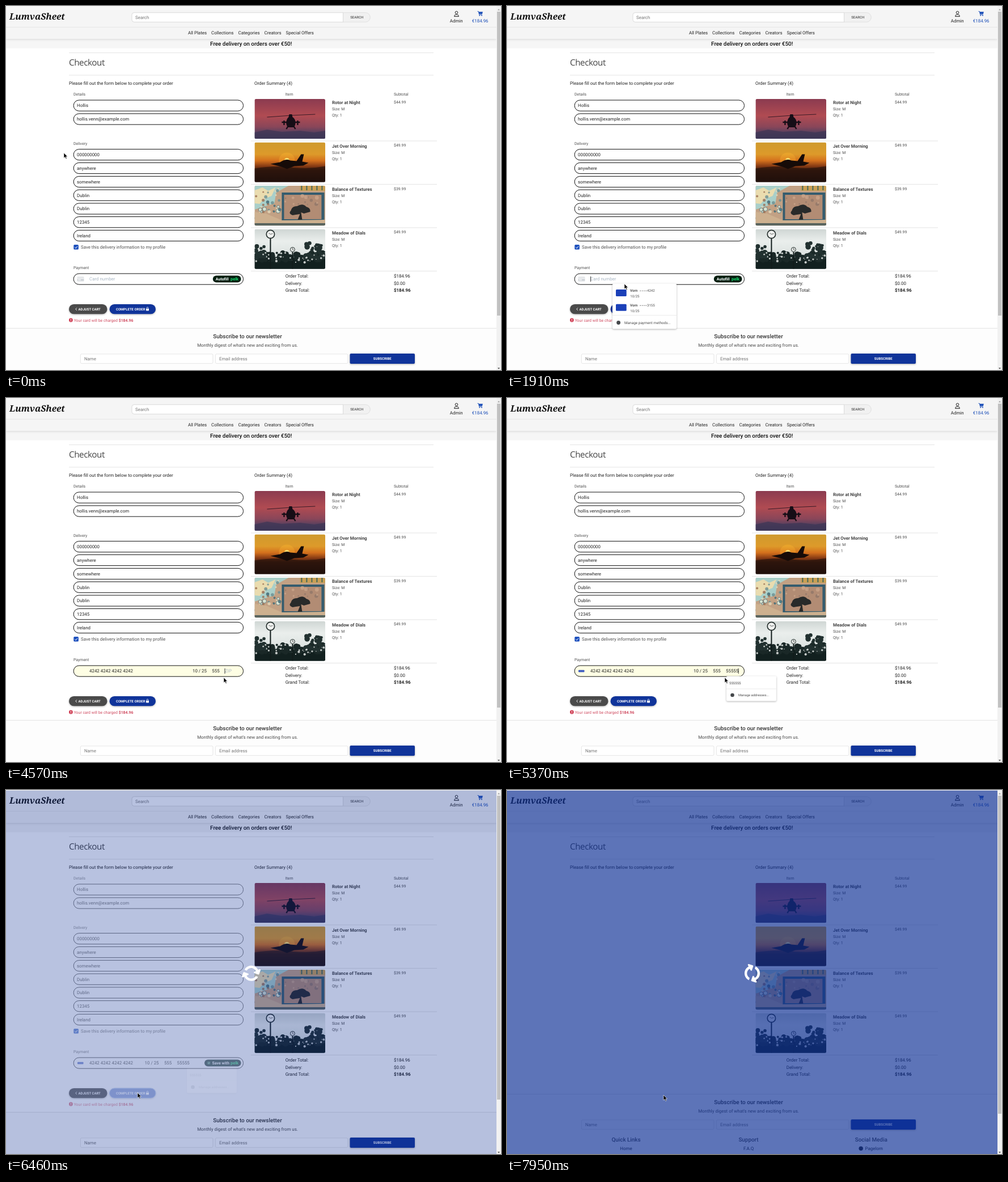
Animation, 873 px wide and 642 px high, one loop 8 s. Source, as an HTML page:

```html
<!DOCTYPE html>
<html lang="en">
<head>
<meta charset="utf-8">
<title>Checkout</title>
<style>
html, body { margin: 0; width: 100%; height: 100%; overflow: hidden; background: #fff; }
svg { display: block; width: 100%; height: 100%; font-family: Roboto, sans-serif; }
text { white-space: pre; text-rendering: geometricPrecision; }
.lift { filter: drop-shadow(0 1px 1.5px rgba(0, 0, 0, .3)); }
.bar { filter: drop-shadow(0 1px 2px rgba(0, 0, 0, .12)); }
</style>
</head>
<body>
<svg id="stage" viewBox="0 0 873 642" xmlns="http://www.w3.org/2000/svg"></svg>
<script>
const LOOP = 8000;
const BLUE = '#10349a', INK = '#212121', GREY = '#4f4f4f', PALE = '#aab7c4';
const MID = ' text-anchor="middle" ', BOLD = ' font-weight="700" ', SEMI = ' font-weight="500" ';

const text = (x, y, s, size = 7.92, fill = INK, more = '') =>
  `<text x="${x}" y="${y}" font-size="${size}" fill="${fill}" ${more}>${s}</text>`;
const rect = (x, y, w, h, fill, r = 0, more = '') =>
  `<rect x="${x}" y="${y}" width="${w}" height="${h}" rx="${r}" fill="${fill}" ${more}/>`;
const circle = (x, y, r, fill, more = '') => `<circle cx="${x}" cy="${y}" r="${r}" fill="${fill}" ${more}/>`;
const path = (d, fill = 'none', more = '') => `<path d="${d}" fill="${fill}" ${more}/>`;
const line = (d, color, width) => path(d, 'none', `stroke="${color}" stroke-width="${width}"`);
const rule = (x1, x2, y, c = '#d9d9d9') => line(`M${x1} ${y}H${x2}`, c, .7);
const group = (id, body) => `<g id="${id}">${body}</g>`;
const fade = (id, ...stops) => `<linearGradient id="${id}" x2="0" y2="1">` +
  stops.map(([o, c]) => `<stop offset="${o}" stop-color="${c}"/>`).join('') + '</linearGradient>';

let seed = 7;
const rnd = () => (seed = seed * 16807 % 2147483647) / 2147483647;
const many = (n, f) => Array.from({ length: n }, (_, i) => f(i)).join('');

function header() {
  return rect(0, 58, 865, 16.5, '#f6f6f6') + rect(0, 1, 865, 57, '#f5f5f5', 0, 'class="bar"') +
    rule(0, 865, 37.3, '#dedede') +
    `<text x="6" y="24" font-family="'Noto Serif', serif" font-style="italic" font-size="15.6" fill="#111"><tspan font-weight="800">Lumva</tspan><tspan font-weight="600">Sheet</tspan></text>` +
    path('M594.5 11.7H226q-4 0-4 4v8.6q0 4 4 4H594.5z', '#fff', 'stroke="#c6c6c6" stroke-width=".6"') +
    path('M594.5 11.7H634a8.3 8.3 0 0 1 0 16.6H594.5z', '#f1f1f1', 'stroke="#d2d2d2" stroke-width=".6"') +
    text(228, 22.8, 'Search', 7.92, '#757575') + text(618.7, 22.3, 'SEARCH', 6, GREY, MID + SEMI) +
    circle(794.5, 11.6, 2.3, 'none', 'stroke="#222"') +
    line('M790.6 18.5q0-3.2 2.6-3.2h2.6q2.6 0 2.6 3.2z', '#222', 1) +
    text(794.2, 29.4, 'Admin', 7.92, INK, MID) +
    line('M831.5 9.5h1.8l1.3 5.8h5', '#1c4fb8', .9) +
    path('M833.5 10.3h7.4l-1 4h-5.6z', '#1c4fb8') + circle(835.2, 16.7, .9, '#1c4fb8') + circle(839, 16.7, .9, '#1c4fb8') +
    text(836.2, 29.4, '€184.96', 7.92, '#1c4fb8', MID) +
    [[321, 'All Plates'], [362, 'Collections'], [409.5, 'Categories'], [455.5, 'Creators'], [493.5, 'Special Offers']]
      .map(([x, s]) => text(x, 50.2, s)).join('') +
    text(432.2, 69.5, 'Free delivery on orders over €50!', 9.9, '#111', MID + SEMI) +
    rule(111, 754, 82.5) + rule(111, 754, 122) +
    text(111, 105.3, 'Checkout', 15.2, '#444', `font-family="'Open Sans', sans-serif" letter-spacing="-.4"`) +
    text(111, 138.8, 'Please fill out the form below to complete your order') +
    text(438, 138.8, 'Order Summary (4)');
}

const photos = [
  () => rect(0, 0, 125, 70, 'url(#dusk)') +
    path('M0 59L22 54 48 58 80 56 105 59 125 56V71H0z', '#3c3655', 'opacity=".7"') +
    line('M22 32L64 29 107 27', '#2a1622', .9) +
    path('M61 27h5l1 5q4 2 5 8t-3 10h-10q-4-4-3-10t4-8z', '#160d16') +
    line('M48 41H80M52 38v8M76 38v8M59 48l-3 5M69 48l3 5', '#160d16', 2.4),
  () => rect(0, 0, 125, 70, 'url(#dawn)') + circle(57, 32, 14, '#ffb52e', 'opacity=".3"') + circle(57, 32, 4.5, '#ffdf70') +
    path('M0 46Q35 40 65 44T125 42V71H0z', '#22100b', 'opacity=".65"') +
    path('M28 38L45 35Q56 28 63 32L74 33 82 21 87 21 84 34 95 36 86 41 70 42 57 47 47 43z', '#160b08'),
  () => rect(0, 0, 125, 70, '#c2a184') + path('M0 0H60L38 12 35 31 0 42z', '#a9cfc9') +
    path('M0 8L14 3 24 9 37 3 30 18 17 23 9 32 0 31z', '#eadcaf') + path('M80 0H125V9H80z', '#c9a055') +
    line('M83 0V8M92 0V8M101 0V8M110 0V8M119 0V8', '#46685b', 2) +
    many(30, i => circle(rnd() * 46, 2 + rnd() * 60, .8 + rnd() * 2.2, ['#6b8f92', '#e6d9b8', '#9c6f52'][i % 3], 'opacity=".8"')) +
    rect(48, 12, 75, 50, '#355c6e') + rect(52, 16, 66, 43, '#b28c74') +
    many(14, i => circle(54 + rnd() * 62, 18 + rnd() * 16, 1 + rnd() * 2.5, i % 2 ? '#cfa98d' : '#8c7468', 'opacity=".7"')) +
    path('M0 46L20 49 48 61 125 60V71H0z', '#cdb08f') + rect(0, 66, 125, 5, '#59645e') +
    path('M76 60l4-10-13 2q-8-3-3-8 2-8 11-8 10-6 16 1 8 2 7 9l-11 3-5-2 2 13z', '#282a2a') +
    many(9, i => circle(8 + rnd() * 38, 23 + rnd() * 25, 1.5 + rnd() * 2.3, i % 2 ? '#527f89' : '#d6e1cf', 'stroke="#45616a" stroke-width=".7"')),
  () => rect(0, 0, 125, 70, 'url(#mist)') + rect(0, 50, 125, 21, '#12201f') +
    many(70, () => circle(rnd() * 125, 42 + rnd() * 13, 2 + rnd() * 4, '#1a2827')) +
    many(32, () => circle(90 + rnd() * 35, 24 + rnd() * 28, 2 + rnd() * 3, '#223130')) +
    many(16, () => circle(rnd() * 20, 30 + rnd() * 24, 2 + rnd() * 3.5, '#223130')) +
    many(32, () => circle(rnd() * 125, 41 + rnd() * 18, .6 + rnd() * 1.7, '#e4e8e6', 'opacity=".85"')) +
    line('M28 15V70M67 40V70', '#111c1b', 2) +
    circle(28, 9, 7.2, '#f0f2f0', 'stroke="#27312f" stroke-width="1.7"') + circle(67, 36, 4, '#e1e5e2', 'stroke="#27312f"') +
    line('M25 7l3 2 4-1M67 33v3l2 1', '#222', .7)
];

function summary() {
  const items = [['Rotor at Night', 44.99], ['Jet Over Morning', 49.99], ['Balance of Textures', 39.99], ['Meadow of Dials', 49.99]];
  const rows = items.map(([name, price], i) => {
    const y = 164 + i * 76.5;
    return `<g transform="translate(438.4 ${y})" clip-path="url(#thumb)">${photos[i]()}</g>` +
      text(575, y + 9, name, 7.92, '#444', BOLD) + text(575, y + 20.2, 'Size: M', 6.93, GREY) +
      text(575, y + 31, 'Qty: 1', 6.93, GREY) + text(684, y + 7.5, '$' + price, 6.93, GREY) + rule(432, 760, y + 74);
  }).join('');
  const totals = [['Order Total:', '$184.96', ''], ['Delivery:', '$0.00', ''], ['Grand Total:', '$184.96', BOLD]]
    .map(([k, v, w], i) => text(492.7, 478.8 + i * 12.7, k) + text(684, 478.8 + i * 12.7, v, 7.92, INK, w)).join('');
  return text(499.6, 158.3, 'Item', 6.93, GREY, MID) + text(684, 158.3, 'Subtotal', 6.93, GREY) + rows + totals;
}

const field = (y, s, id = '') =>
  rect(119.2, y - 9.6, 299.3, 19.2, '#fff', 9.6, `stroke="#111" ${id && `id="${id}"`}`) + text(125, y + 2.8, s);
const pill = (x, s, sx) => rect(x, 475.4, 414.5 - x, 12.2, '#011e0f', 6.1) +
  text(sx, 484.2, s, 7, '#fff', BOLD) + text(396, 484.2, 'pelk', 7.4, '#19d66b', BOLD);

function form() {
  const label = (y, s) => text(119, y, s, 6.93, GREY);
  const rows = [[175.6, 'Hollis'], [199.5, 'hollis.venn@example.com'], [262.2, '000000000'], [286, 'anywhere'],
    [310, 'somewhere'], [333.7, 'Dublin'], [357.5, 'Dublin'], [381.2, '12345'], [405, 'Ireland']];
  return label(158.3, 'Details') + label(244.5, 'Delivery') + label(464, 'Payment') +
    rows.map(([y, s]) => field(y, s)).join('') +
    rect(119.3, 421, 8.6, 8.6, '#1d50bd', 1.5) + line('M121.3 425.5l1.8 1.8 3-3.7', '#fff', 1) +
    text(132, 428.2, 'Save this delivery information to my profile', 7.92, GREY) +
    field(481.6, '', 'payBox') +
    group('cardIcon', rect(125.5, 477.8, 12, 7.8, '#d3d7db', 1.2) + rect(125.5, 479.3, 12, 1.4, '#fff') + rect(127, 482.3, 5, 1.4, '#fff')) +
    rect(126, 479.8, 10.5, 3.8, '#3f5cc0', .8, 'id="brandIcon"') +
    text(147, 484.4, '', 7.92, INK, 'id="num"') + text(329, 484.4, '', 7.92, INK, 'id="exp"') +
    text(363.3, 484.4, '', 7.92, INK, 'id="cvc"') + text(386, 484.4, '', 7.92, INK, 'id="zip"') +
    rect(0, 477, .9, 9.3, '#222', 0, 'id="caret"') +
    group('fillPill', pill(364.8, 'Autofill', 369.8)) +
    group('savePill', pill(350, 'Save with', 363.5) + rect(355.2, 479, 5, 5, '#2d6b49', 1) + line('M356.3 481.5l1 1 1.8-2', '#b8e8cc', .6)) +
    group('order', rect(182.5, 526, 81.5, 17.3, BLUE, 8.65, 'id="orderBox" class="lift"') +
      text(194, 536.8, 'COMPLETE ORDER', 6, '#fff', BOLD) + rect(247, 533.7, 5, 3.7, '#fff', .6) +
      line('M248.1 534v-1.4a1.4 1.4 0 0 1 2.8 0V534', '#fff', .8)) +
    circle(114.4, 554, 3.4, '#cf3f55') + rect(113.9, 552, 1, 2.4, '#fff') + rect(113.9, 555.1, 1, 1, '#fff') +
    text(119.7, 556.5, 'Your card will be charged <tspan font-weight="700">$184.96</tspan>', 6.93, '#cf4a5f');
}

const adjust = () => rect(111, 526, 67.5, 17.3, '#4a4a4a', 8.65, 'class="lift"') +
  line('M124.8 532.4l-2 2.2 2 2.2', '#fff', 1) + text(127.5, 536.8, 'ADJUST CART', 6, '#fff', BOLD);

function footer() {
  const box = (x, s) => rect(x, 613.8, 233.5, 16.6, '#fff', 2, 'stroke="#d5d5d5" stroke-width=".6"') + text(x + 6.5, 624.8, s, 7.92, '#757575');
  const col = (x, head, s, dx = 0) => text(x, 651.7, head, 9.9, '#4a4a4a', MID + SEMI) + text(x + dx, 667, s, 7.92, INK, MID);
  return rect(0, 568.5, 865, 130, '#fdfdfd') + rule(0, 865, 568.4) +
    text(426, 585.8, 'Subscribe to our newsletter', 9.9, '#333', MID + SEMI) +
    text(426, 601, "Monthly digest of what's new and exciting from us.", 7.92, '#4a4a4a', MID) +
    box(131.4, 'Name') + box(369.4, 'Email address') +
    rect(606.5, 613, 114.5, 18, BLUE, 2, 'class="lift"') + text(663.8, 624.3, 'SUBSCRIBE', 6, '#fff', MID + BOLD) +
    col(210, 'Quick Links', 'Home') + col(426, 'Support', 'F.A.Q') + col(642.3, 'Social Media', 'Pagelorn', 5) + circle(624.2, 664.3, 3.7, '#222');
}

function cardMenu() {
  const row = (y, n) => rect(192, y - 6, 18.7, 12, '#1b40b8', 1.5) + text(217, y - 1.6, 'Vorn', 6.3, '#333', SEMI) +
    many(4, i => circle(235.2 + i * 3.3, y - 3.6, .7, '#444')) + text(247, y - 1.6, n, 6.1, GREY) + text(217.3, y + 8, '10/25', 6.1, GREY);
  return rect(186, 489.5, 113, 80, '#fff', 2, 'class="lift"') + rect(186, 494, 113, 23, '#eee', 0, 'id="rowHover"') +
    row(506, '4242') + row(531.8, '3155') + rule(186, 299, 545.5, '#e2e2e2') +
    circle(196.6, 558.5, 3.4, '#45484b') + text(207, 560.8, 'Manage payment methods...', 6.45, GREY);
}

const zipMenu = () => rect(0, 490.5, 88, 44, '#fff', 2, 'class="lift"') + text(5, 505, '555555', 6.1, '#444') +
  rule(0, 88, 513, '#e2e2e2') + circle(10.5, 524, 3.3, '#45484b') + text(21, 526.3, 'Manage addresses...', 5.85, GREY);

const sync = 'M370.7 133.3C339.5 104 298.9 88 255.8 88c-77.4 0-144.3 53.2-162.8 126.9-1.3 5.3-6.1 9.1-11.6 9.1H24.1c-7.5 0-13.2-6.8-11.8-14.2C33.9 94.900 134.800 8 256 8c66.400 0 126.800 26.100 171.300 68.700L463 41C478 26 504 36.500 504 58V192c0 13.300-10.700 24-24 24H346c-21.400 0-32-25.900-17-41z';

const $ = id => document.getElementById(id);
$('stage').innerHTML = '<defs>' +
  fade('dusk', [0, '#8b3b50'], [.42, '#b04b52'], [.7, '#8a4659'], [.86, '#54405f'], [1, '#3c3655']) +
  fade('dawn', [0, '#cf9a2e'], [.3, '#dd9a2a'], [.46, '#d4711d'], [.6, '#863a14'], [.7, '#44200f'], [1, '#190d0a']) +
  fade('mist', [0, '#cfd6d4'], [.3, '#eaeeec'], [.65, '#dde3e1'], [1, '#6c7572']) +
  '<clipPath id="thumb"><rect width="124.6" height="70.3" rx="2.5"/></clipPath></defs>' +
  rect(0, 0, 873, 642, '#fff') + header() + summary() + group('foot', footer()) +
  group('form', form()) + group('adjust', adjust()) + group('cardMenu', cardMenu()) +
  rect(0, 1, 865, 641, '#0e3196', 0, 'id="veil"') +
  group('spin', `<g transform="scale(.0547) translate(-256 -256)">${path(sync, '#fff')}${path(sync, '#fff', 'transform="rotate(180 256 256)"')}</g>`) +
  group('zipMenu', zipMenu()) +
  rect(865, 0, 8, 642, '#f1f1f1') + rect(866, 10, 6, 536, '#c1c1c1', 0, 'id="thumbBar"') +
  path('M867 7.5l2-2.5 2 2.5z', '#a0a0a0') + path('M867 638l2 2.5 2-2.5z', '#505050') +
  group('arrow', path('M0 0V9.2L2.2 7.3 3.7 10.6 5.2 9.9 3.7 6.7H6.5z', '#000', 'stroke="#fff" stroke-width=".6"')) +
  group('beam', line('M-1.5-5Q0-5 0-4V4Q0 5-1.5 5M1.5-5Q0-5 0-4M0 4Q0 5 1.5 5', '#111', .9)) +
  group('hand', path('M-.5 0q1-.8 1.5 .5V4l4 1q1 .4 .9 1.5L5.3 10H.8L-2.3 6q0-1.4 1.8-.2z', '#fff', 'stroke="#000" stroke-width=".8"'));

const clamp = v => Math.max(0, Math.min(1, v));
const ramp = (t, a, b) => clamp((t - a) / (b - a));
const ease = p => p * p * (3 - 2 * p);
const set = (id, k, v) => $(id).setAttribute(k, v);
const show = (id, on) => set(id, 'opacity', +on);
const write = (id, s, fill = INK) => { $(id).textContent = s; set(id, 'fill', fill); };

// Pointer moves: start, end, target x, target y.
const moves = [[100, 490, 237, 418], [720, 810, 254, 404], [970, 1280, 190, 479], [1800, 1910, 207, 490],
  [1910, 2070, 214, 501], [2460, 3110, 374, 484], [3180, 3260, 384, 493], [5770, 6160, 232, 534], [6600, 7080, 276, 538]];

function pointer(t) {
  let x = 102, y = 259;
  for (const [a, b, tx, ty] of moves) {
    const p = ease(ramp(t, a, b));
    x += (tx - x) * p;
    y += (ty - y) * p;
  }
  const kind = t >= 6120 && t < 6415 ? 'hand' : y > 472 && y < 489 && x > 120 && x < 418 && t < 5770 ? 'beam' : 'arrow';
  for (const id of ['arrow', 'beam', 'hand']) show(id, id === kind);
  set(kind, 'transform', `translate(${x} ${y})`);
}

function payment(t) {
  const preview = t >= 2030, filled = t >= 2390, done = t >= 5560;
  const cvc = t < 4080 ? '' : t < 4540 ? '5' : '555';
  const zip = '5'.repeat(Math.max(0, Math.min(5, Math.floor((t - 4720) / 140) + 1)));
  write('num', preview ? '4242 4242 4242 4242' : 'Card number', preview ? INK : PALE);
  write('exp', preview ? '10 / 25' : '');
  write('cvc', cvc || (preview ? 'CVC' : ''), cvc ? INK : PALE);
  write('zip', zip || (filled ? 'ZIP' : ''), zip ? INK : PALE);
  const shift = done ? -84.4 : 0;
  for (const id of ['exp', 'cvc', 'zip']) set(id, 'transform', `translate(${shift})`);
  set('payBox', 'fill', preview && !done ? '#fefee4' : '#fff');
  show('fillPill', !preview);
  show('savePill', done);
  const blank = t >= 4500 && t < 4640;
  const branded = (filled && t < 3180) || t >= 4640;
  show('brandIcon', branded);
  show('cardIcon', !branded && !blank);

  let x = 147.2, since = 1440;
  if (filled) { x = 363 + cvc.length * 4.45; since = t < 4080 ? 2040 : 4080; }
  if (t >= 4540) { x = 385.5 + zip.length * 4.45 + shift; since = zip ? 4720 + (zip.length - 1) * 140 : 4540; }
  set('caret', 'x', x);
  show('caret', t >= 1440 && t < 6320 && (t - since) % 1020 < 510);

  show('rowHover', t >= 2000);
  set('cardMenu', 'opacity', ramp(t, 1480, 1620) * (1 - ramp(t, 2390, 2540)));
  set('zipMenu', 'opacity', ramp(t, 4860, 5000) * (1 - ramp(t, 6300, 6520)) ** 2);
  set('zipMenu', 'transform', `translate(${done ? 319 : 387})`);
}

function frame(t) {
  pointer(t);
  payment(t);
  const hover = t >= 6100, pressed = t >= 6320, veil = ease(ramp(t, 6415, 6515)), gone = t >= 6515;
  set('orderBox', 'fill', hover ? '#1c48b0' : BLUE);
  set('orderBox', 'stroke', pressed ? '#7b9ce0' : 'none');
  set('order', 'opacity', t >= 6415 ? .65 : 1);
  set('form', 'opacity', 1 - veil);
  set('adjust', 'opacity', gone ? 0 : 1 - veil * .6);
  set('foot', 'transform', `translate(0 ${gone ? -32 : 0})`);
  set('thumbBar', 'height', gone ? 561 : 536);
  set('veil', 'opacity', veil * .67);
  show('spin', t >= 6415);
  set('spin', 'transform', `translate(432.5 323.3) rotate(${(t - 6350) * .18})`);
}

const start = performance.now();
function tick() {
  frame((performance.now() - start) % LOOP);
  requestAnimationFrame(tick);
}
tick();
</script>
</body>
</html>
```
